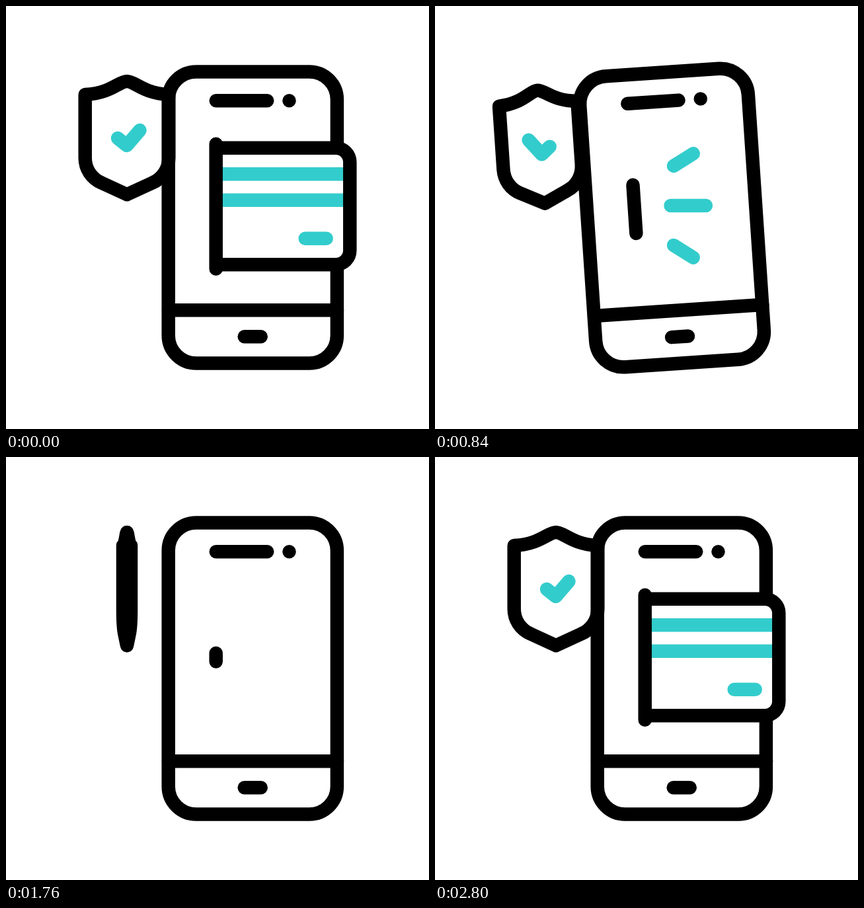
Recreate the animation shown at these times as an HTML page with a canvas. Size 640x640 px, loop 3 s.

```html
<!DOCTYPE html>
<html lang="en">
<head>
<meta charset="utf-8">
<title>Secure mobile payment</title>
<style>
  html, body { margin: 0; width: 100%; height: 100%; overflow: hidden; background: #fff; }
  canvas { display: block; }
</style>
</head>
<body>
<canvas id="stage" width="640" height="640"></canvas>
<script>
const ctx = document.getElementById('stage').getContext('2d');
const BLACK = '#000', TEAL = '#33cccc', LINE = 20.5;
const LOOP = 3000, MOVE = 2800, STEP = 40;
const PIVOT = { x: 373.2, y: 540.5 };
const SLOT = { x: 317.7, y: 303.2, half: 94.5 };

const sine = x => (1 - Math.cos(Math.PI * x)) / 2;
const quadOut = x => 1 - (1 - x) ** 2;

// Eased progress from 0 to 1 between two times.
function rise(t, start, end, ease = sine) {
  return ease(Math.min(1, Math.max(0, (t - start) / (end - start))));
}

// The phone leans right, swings left, settles, then leans right once more.
function tiltAt(t) {
  return 3.25 * rise(t, 0, 400) - 8.5 * rise(t, 400, 1000) + 5.25 * rise(t, 1000, 1320)
    + 2.7 * (rise(t, 1760, 2300) - rise(t, 2300, 2760));
}

// The shield spins twice; each turn has a quick half and a slower half.
function turnAt(t) {
  const start = 214, quick = 545, slow = 712, spin = quick + slow;
  const local = t - start;
  if (local <= 0 || local >= 2 * spin) return 1;
  const part = local % spin;
  return part < quick ? Math.cos(Math.PI * part / quick) : -Math.cos(Math.PI * (part - quick) / slow);
}

// The card pulls out a little, slips into the slot and later shoots back out.
function slideAt(t) {
  return 27 * rise(t, 0, 320) - 243 * rise(t, 320, 760)
    + 241 * rise(t, 1860, 2328, quadOut) - 25 * rise(t, 2328, 2760);
}

const slotAt = t => 1 - rise(t, 680, 960) + rise(t, 1720, 1960);

function stroke(color) {
  ctx.strokeStyle = color;
  ctx.stroke();
}

function line(color, x0, y0, x1, y1) {
  ctx.beginPath();
  ctx.moveTo(x0, y0);
  ctx.lineTo(x1, y1);
  stroke(color);
}

// Strokes keep their weight while the shape is squeezed sideways.
function squeezed(scale, color, build) {
  ctx.save();
  ctx.translate(183, 0);
  ctx.scale(scale || 0.001, 1);
  ctx.beginPath();
  build();
  ctx.restore();
  stroke(color);
}

function drawShield(scale) {
  squeezed(scale, TEAL, () => {
    ctx.moveTo(-14, 200);
    ctx.lineTo(-0.3, 211);
    ctx.lineTo(19.5, 188);
  });
  squeezed(scale, BLACK, () => {
    for (const side of [-1, 1]) {
      const edge = 63.3 * side;
      ctx.moveTo(0, 114);
      ctx.bezierCurveTo(12 * side, 114, 24 * side, 132, edge, 134);
      ctx.lineTo(edge, 230);
      ctx.bezierCurveTo(edge, 246, 54 * side, 261, 38 * side, 267.8);
      ctx.lineTo(0, 285.3);
    }
  });
}

function drawPhone() {
  ctx.beginPath();
  ctx.roundRect(245.7, 99.5, 255.2, 441, 42);
  stroke(BLACK);
  line(BLACK, 246, 460.3, 501, 460.3);
  line(BLACK, 317.8, 143.2, 395.2, 143.2);
  line(BLACK, 360.7, 500.2, 385.7, 500.2);
  line(BLACK, 428.5, 143.2, 428.5, 143.2);
}

function drawCard(shift) {
  if (shift <= -215) return;
  ctx.save();
  ctx.beginPath();
  ctx.rect(SLOT.x, 0, 640, 640);
  ctx.clip();
  ctx.translate(shift, 0);

  const body = new Path2D();
  body.roundRect(200, 214.8, 320.3, 176.4, [0, 21.5, 21.5, 0]);
  ctx.fillStyle = '#fff';
  ctx.fill(body);
  ctx.fillStyle = TEAL;
  for (const y of [244, 283.5]) ctx.fillRect(200, y, 320, LINE);
  line(TEAL, 452.7, 351.8, 484.7, 351.8);
  ctx.strokeStyle = BLACK;
  ctx.stroke(body);
  ctx.restore();
}

function drawSlot(open) {
  const half = SLOT.half * open;
  if (half > 0) line(BLACK, SLOT.x, SLOT.y - half, SLOT.x, SLOT.y + half);
}

// Three rays fan out, then their tails catch up with their tips.
function drawSparks(t) {
  const tip = rise(t, 700, 860), tail = rise(t, 860, 1020);
  if (tip <= 0 || tail >= 1) return;
  for (const side of [-1, 0, 1]) {
    const x = side ? 361 : 356.5, y = 302 + 60 * side;
    const angle = side * 0.56, length = side ? 36.5 : 55.5;
    const dx = length * Math.cos(angle), dy = length * Math.sin(angle);
    line(TEAL, x + dx * tail, y + dy * tail, x + dx * tip, y + dy * tip);
  }
}

function draw(t) {
  ctx.fillStyle = '#fff';
  ctx.fillRect(0, 0, 640, 640);
  ctx.lineWidth = LINE;
  ctx.lineCap = ctx.lineJoin = 'round';

  ctx.save();
  ctx.translate(PIVOT.x, PIVOT.y);
  ctx.rotate(tiltAt(t) * Math.PI / 180);
  ctx.translate(-PIVOT.x, -PIVOT.y);
  drawShield(turnAt(t));
  drawPhone();
  drawCard(slideAt(t));
  drawSlot(slotAt(t));
  ctx.restore();

  drawSparks(t);
}

const began = performance.now();
function tick() {
  const t = (performance.now() - began) % LOOP;
  draw(Math.min(MOVE, Math.floor(t / STEP) * STEP));
  requestAnimationFrame(tick);
}
tick();
</script>
</body>
</html>
```
